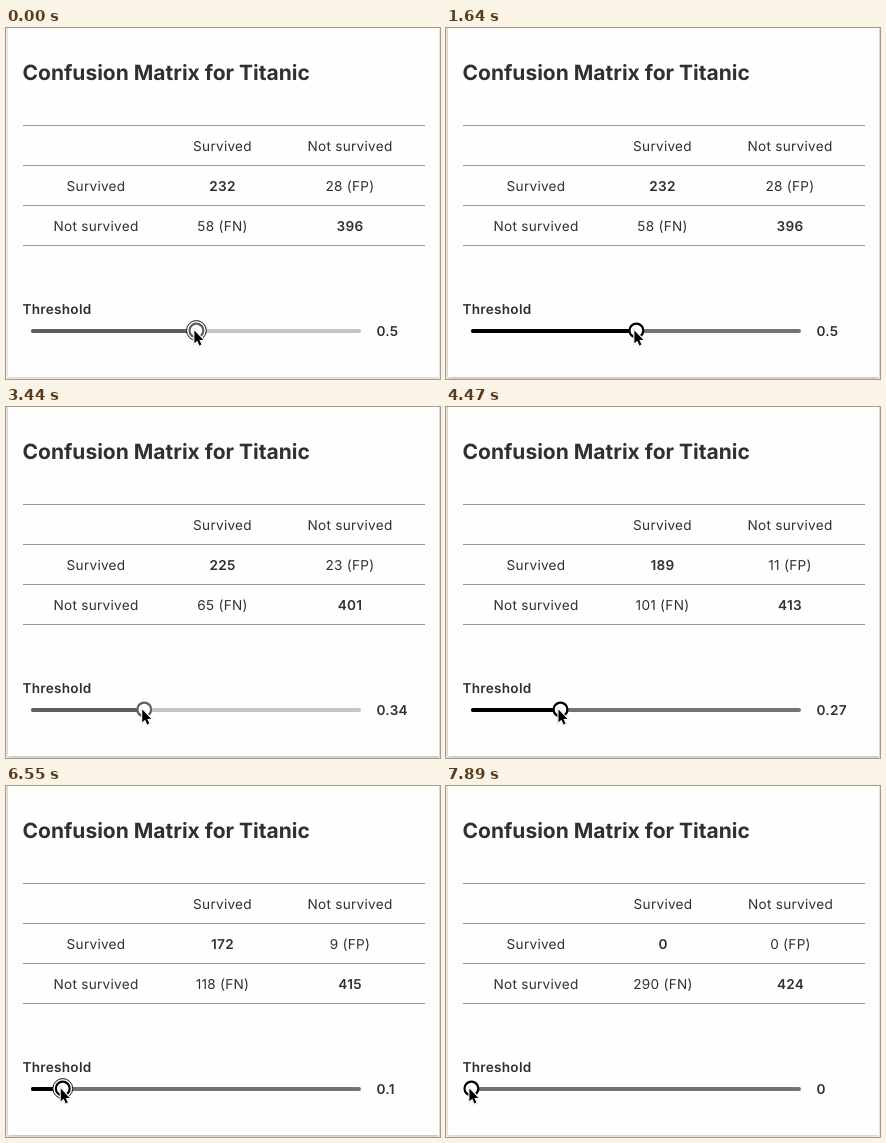
An HTML page for the animation above (8000 ms loop, 434 px wide and 351 px high).

```html
<!DOCTYPE html>
<html lang="en">
<head>
<meta charset="utf-8">
<title>Confusion matrix</title>
<style>
html, body { margin: 0; width: 100%; height: 100%; overflow: hidden; background: #f7f7f7; }
.card { position: absolute; left: 2px; top: -10px; width: 431px; height: 359px; background: #fefefe; }
svg { position: absolute; left: 0; top: 0; display: block; }
text { font: 400 13.6px Inter, sans-serif; letter-spacing: .02em; fill: #303030; text-rendering: geometricPrecision; }
.bold { font-weight: 600; }
.title { font-size: 21px; font-weight: 700; letter-spacing: 0; }
.cell { text-anchor: middle; }
#cursor { filter: drop-shadow(0 .8px .7px rgba(0,0,0,.35)); }
</style>
</head>
<body>
<div class="card" id="card"></div>
<svg width="434" height="351" viewBox="0 0 434 351">
  <text class="title" x="16.5" y="52">Confusion Matrix for Titanic</text>
  <path d="M17 97.5H419M17 137.5H419M17 177.5H419M17 217.5H419" stroke="#999"/>
  <text class="cell" x="90" y="163">Survived</text>
  <text class="cell" x="90" y="203">Not survived</text>
  <g id="cells">
    <text class="cell" x="216.5" y="123">Survived</text>
    <text class="cell" x="344" y="123">Not survived</text>
    <text class="cell bold" id="tp" x="216.5" y="163"></text>
    <text class="cell" id="fp" x="344" y="163"></text>
    <text class="cell" id="fn" x="216.5" y="203"></text>
    <text class="cell bold" id="tn" x="344" y="203"></text>
  </g>
  <text class="bold" x="16.5" y="286">Threshold</text>
  <rect id="track" x="25" y="301" width="330" height="4" rx="2"/>
  <rect id="fill" x="25" y="301" height="4" rx="2"/>
  <g id="knob">
    <circle id="ring" r="9.9" fill="#fff" stroke="#111"/>
    <circle id="dot" r="6.9" fill="#fff" stroke-width="2.2"/>
    <path id="cursor" transform="translate(-2 0)" d="M0 0V12.8L2.9 10.2L5 15L7 14.1L5 9.5H9Z"
      stroke="#fff" paint-order="stroke" stroke-width="2.2"/>
  </g>
  <text class="bold" id="value" x="370.5" y="308"></text>
</svg>
<script>
const LOOP = 8000, FRAME = 145;
const START = 25, WIDTH = 330, KNOB_Y = 302.5;
const POSITIVES = 290, NEGATIVES = 424;
const el = id => document.getElementById(id);

// Each drag runs from one time to another and ends in the given state.
const initial = { threshold: .5, tp: 232, fp: 28 };
const drags = [
  { from: 1940, to: 2390, threshold: .45, tp: 229, fp: 26 },
  { from: 2840, to: 3440, threshold: .342, tp: 225, fp: 23 },
  { from: 3890, to: 4470, threshold: .27, tp: 189, fp: 11 },
  { from: 4910, to: 5510, threshold: .2, tp: 172, fp: 9 },
  { from: 6100, to: 6550, threshold: .095, tp: 172, fp: 9 },
  { from: 6840, to: 7740, threshold: 0, tp: 0, fp: 0 }
];

const between = (t, from, to) => t >= from && t < to;
const set = (id, attrs) => {
  for (const name in attrs) el(id).setAttribute(name, attrs[name]);
};

function stateAt(t) {
  let state = initial;
  for (const drag of drags) {
    if (t < drag.from) break;
    const step = time => Math.floor((time - drag.from) / FRAME) + 1;
    const progress = Math.min(1, step(t) / step(drag.to));
    const mix = key => state[key] + (drag[key] - state[key]) * progress;
    state = { threshold: mix("threshold"), tp: mix("tp"), fp: mix("fp") };
  }
  return state;
}

function render(t) {
  const { threshold, ...counts } = stateAt(t);
  const tp = Math.round(counts.tp), fp = Math.round(counts.fp);
  el("tp").textContent = tp;
  el("fp").textContent = `${fp} (FP)`;
  el("fn").textContent = `${POSITIVES - tp} (FN)`;
  el("tn").textContent = NEGATIVES - fp;
  el("value").textContent = Number(threshold.toFixed(2));
  set("cells", { transform: `translate(${tp ? 0 : .5} 0)` });

  const x = START + WIDTH * threshold;
  const idle = t < 900 || between(t, 2840, 3590);
  const ringed = t < 300 || between(t, 6250, 6840);
  const dark = idle ? "#5e5e5e" : "#000";
  set("track", { fill: idle ? "#c6c6c6" : "#747474" });
  set("fill", { width: x - START, fill: dark });
  set("knob", { transform: `translate(${x + .4} ${KNOB_Y})` });
  set("ring", { visibility: ringed ? "visible" : "hidden" });
  set("dot", { stroke: dark });

  const lifted = between(t, 900, 5360) || between(t, 5950, 7290);
  el("card").style.boxShadow = `0 1px 4px rgba(0,0,0,${lifted ? .32 : .2})`;
}

function tick(now) {
  render(now % LOOP);
  requestAnimationFrame(tick);
}
render(0);
requestAnimationFrame(tick);
</script>
</body>
</html>
```
